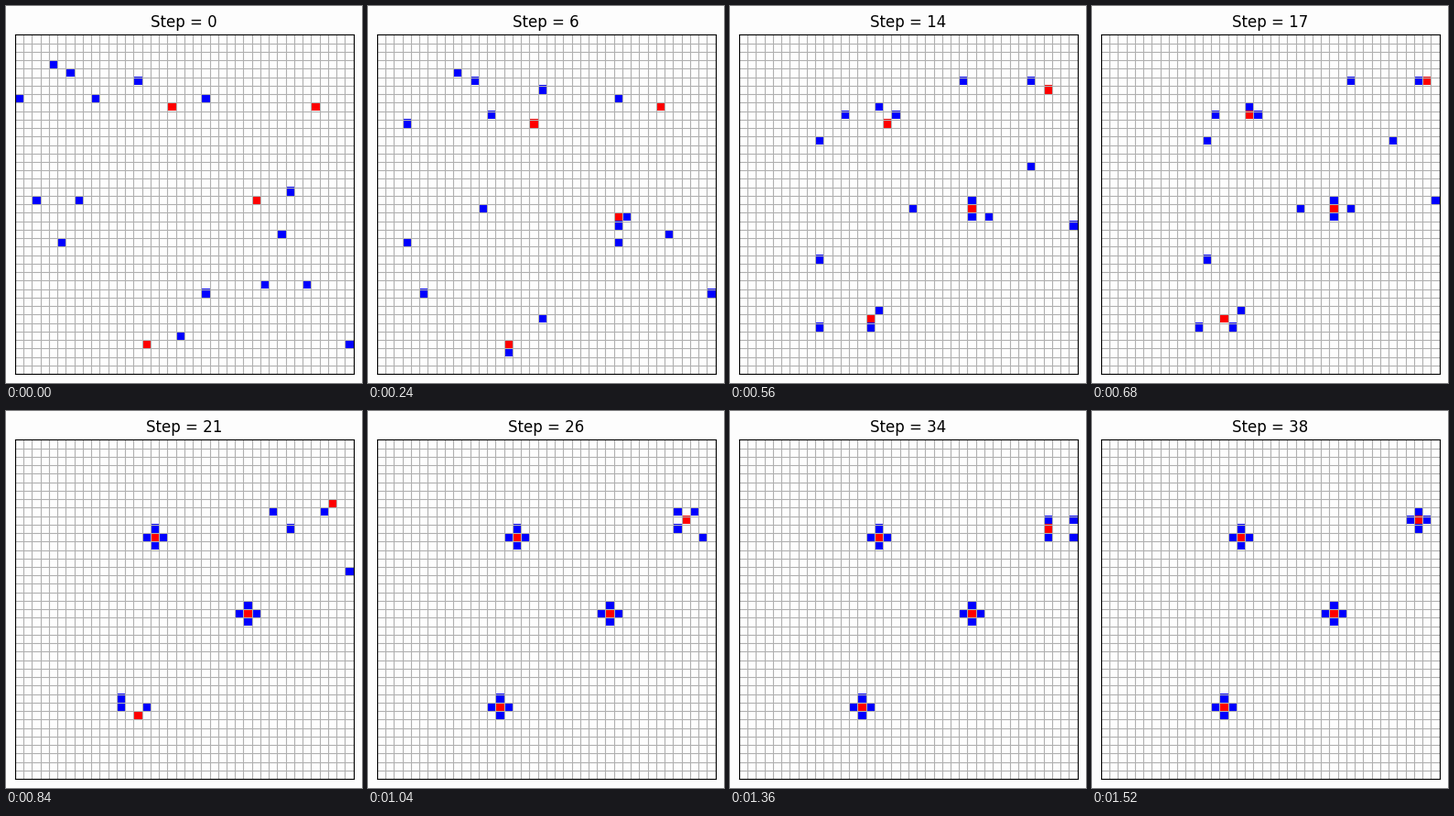
Recreate the animation shown at these times as a matplotlib script. Size 389 px wide and 411 px high, loop 1.56 s.

```python
import numpy as np
import matplotlib.pyplot as plt
from matplotlib.animation import FuncAnimation

W, H, DPI = 389, 411, 100
CELLS = 40
STEPS = 39
SIDE = 369.6
MARGIN = 10
PAPER = (253, 253, 253)
BLUE = (0, 0, 255)
RED = (255, 0, 0)

# Cells beside a caught prey: left, top, right, bottom.
SLOTS = [(-1, 0), (0, -1), (1, 0), (0, 1)]


def walk(route, moves):
    """Cell reached on a route after single moves, rows before columns."""
    x, y = route[0]
    for tx, ty in route[1:]:
        for _ in range(abs(tx - x) + abs(ty - y)):
            if moves <= 0:
                return x, y
            if y != ty:
                y += 1 if ty > y else -1
            else:
                x += 1 if tx > x else -1
            moves -= 1
    return x, y


class Team:
    """Four hunters roam along their routes, then close in on the prey."""

    def __init__(self, close, prey, routes):
        self.close = close
        self.prey = prey
        self.routes = routes

    def prey_cell(self, step):
        times = list(self.prey)
        return tuple(round(np.interp(step, times, axis))
                     for axis in zip(*self.prey.values()))

    def hunter_cells(self, step):
        px, py = self.prey_cell(STEPS)
        for route, (sx, sy) in zip(self.routes, SLOTS):
            cell = walk(route, min(step, self.close))
            yield walk([cell, (px + sx, py + sy)], step - self.close)


TEAMS = [
    Team(17, {0: (18, 8), 6: (18, 10), 11: (17, 11), 17: (17, 9),
              22: (16, 11)}, [
        [(4, 3), (9, 4), (10, 8), (13, 9)],
        [(6, 4), (11, 5), (14, 7), (17, 8)],
        [(9, 7), (13, 9), (17, 10), (18, 9)],
        [(0, 7), (3, 10), (12, 12)],
    ]),
    Team(34, {0: (35, 8), 6: (33, 8), 11: (34, 7), 17: (38, 5), 26: (36, 9),
              30: (39, 10), 34: (36, 10), 38: (37, 9)}, [
        [(14, 5), (24, 6), (29, 5), (35, 8), (36, 9)],
        [(22, 7), (33, 7), (37, 5), (34, 8), (37, 8), (39, 9)],
        [(39, 36), (38, 11), (39, 11)],
        [(34, 29), (31, 10), (35, 10), (36, 11)],
    ]),
    Team(17, {0: (28, 19), 6: (28, 21), 11: (27, 20)}, [
        [(7, 19), (23, 20)],
        [(32, 18), (29, 21), (28, 18), (27, 19)],
        [(29, 29), (28, 24), (27, 25), (29, 23), (29, 20)],
        [(31, 23), (28, 24), (27, 22), (27, 21)],
    ]),
    Team(17, {0: (15, 36), 6: (15, 36), 11: (16, 33), 17: (14, 33),
              23: (14, 31)}, [
        [(5, 24), (7, 33), (11, 34)],
        [(2, 19), (3, 24), (7, 25), (12, 26)],
        [(22, 30), (19, 33), (17, 34), (16, 32)],
        [(19, 35), (15, 37), (16, 38), (15, 34)],
    ]),
]


def board(step):
    grid = np.full((CELLS, CELLS, 3), PAPER, dtype=np.uint8)
    for team in TEAMS:
        for x, y in team.hunter_cells(step):
            grid[y, x] = BLUE
        x, y = team.prey_cell(step)
        grid[y, x] = RED
    return grid


fig = plt.figure(figsize=(W / DPI, H / DPI), dpi=DPI, facecolor="#fdfdfd")
ax = fig.add_axes([MARGIN / W, MARGIN / H, SIDE / W, SIDE / H])
image = ax.imshow(board(0), interpolation="nearest")
edges = np.arange(CELLS + 1) - 0.5
ax.set_xticks(edges)
ax.set_yticks(edges)
ax.tick_params(length=0, labelbottom=False, labelleft=False)
ax.grid(color="#b0b0b0", linewidth=0.8)
title = ax.set_title("Step = 0", fontsize=12, family="DejaVu Sans")


def update(step):
    image.set_data(board(step))
    title.set_text(f"Step = {step}")
    return image, title


anim = FuncAnimation(fig, update, frames=STEPS, interval=40, repeat=True,
                     repeat_delay=0, blit=False)
plt.show()
```
